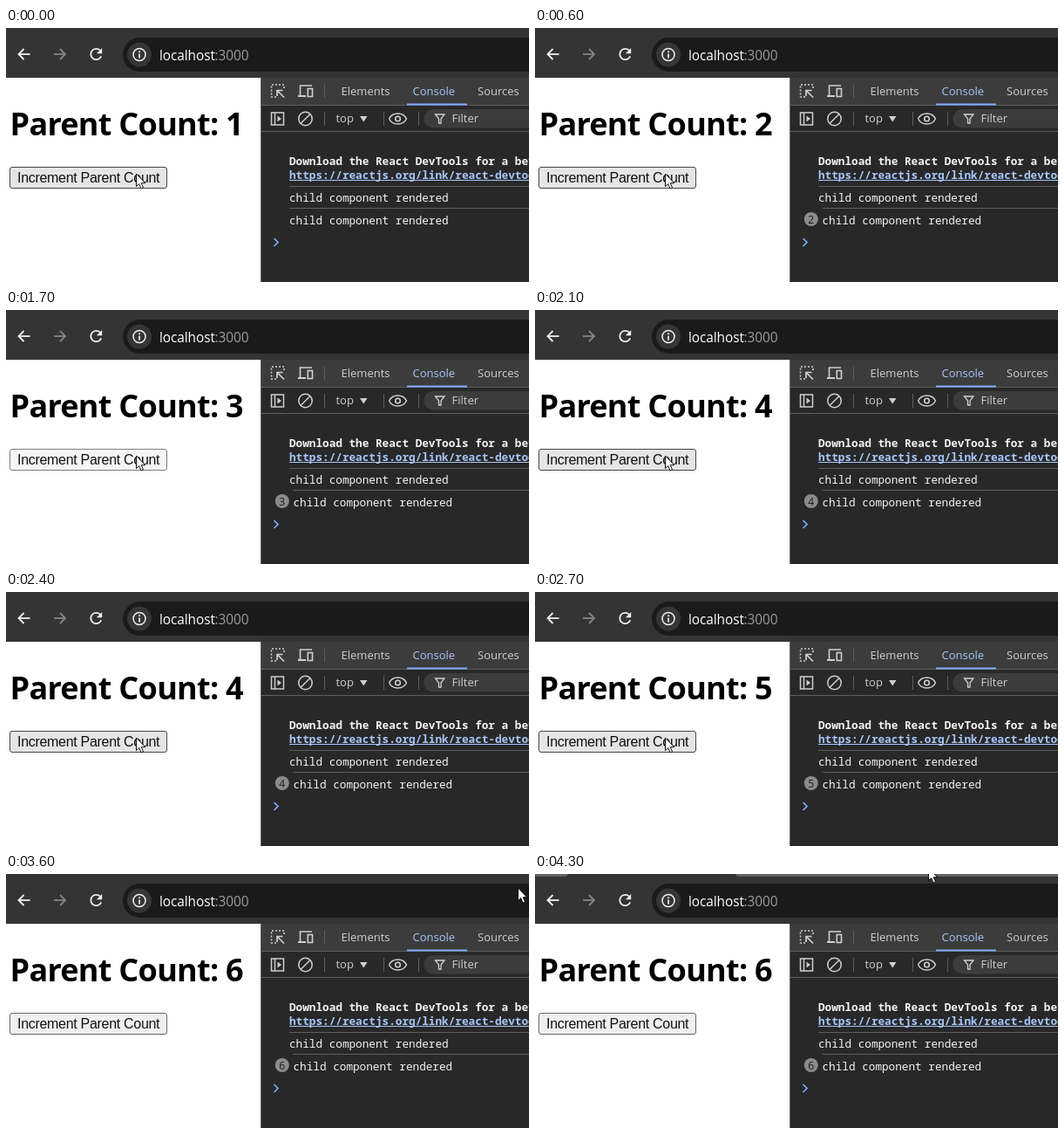
These frames come from a looping animation (600x291 px, 4400 ms). An HTML page with a canvas:

```html
<!DOCTYPE html>
<html lang="en">
<head>
<meta charset="utf-8">
<title>Parent Count</title>
<style>
  html, body { margin: 0; width: 100%; height: 100%; overflow: hidden; background: #fff; }
  canvas { display: block; width: 600px; height: 291px; }
</style>
</head>
<body>
<canvas id="stage"></canvas>
<script>
const W = 600, H = 291, LOOP = 4400, STEP = 100;
const UI = '"Open Sans", "Noto Sans", sans-serif';
const MONO = '"Noto Sans Mono", "DejaVu Sans Mono", monospace';
const ARIAL = '"Liberation Sans", Arial, sans-serif';
const BAR = '#3c3c3c', CONSOLE = '#282828', RULE = '#5e5e5e';
const ICON = '#cfcfcf', BLUE = '#7cacf8', PALE = '#a8c7fa';

const canvas = document.getElementById('stage');
const ctx = canvas.getContext('2d');
const dpr = window.devicePixelRatio || 1;
canvas.width = W * dpr;
canvas.height = H * dpr;

// Each release of the button adds one; it is held down just before.
const CLICKS = [400, 1100, 1800, 2600, 3200];
const HOLD = 100;
const POINTER = [[0, 149, 167], [3300, 149, 167], [3600, 587, 16], [3800, 570, 8], [4200, 451, -7]];

function rect(x, y, w, h, color) {
  ctx.fillStyle = color;
  ctx.fillRect(x, y, w, h);
}

function pill(x, y, w, h, r, fill, stroke) {
  ctx.beginPath();
  ctx.roundRect(x, y, w, h, r);
  ctx.fillStyle = fill;
  ctx.fill();
  if (stroke) { ctx.strokeStyle = stroke; ctx.lineWidth = 1; ctx.stroke(); }
}

function disc(x, y, r, color) {
  ctx.beginPath();
  ctx.arc(x, y, r, 0, 7);
  ctx.fillStyle = color;
  ctx.fill();
}

function ring(x, y, r, color, width) {
  ctx.beginPath();
  ctx.arc(x, y, r, 0, 7);
  ctx.strokeStyle = color;
  ctx.lineWidth = width;
  ctx.stroke();
}

function line(points, color, width = 1.5) {
  ctx.beginPath();
  points.forEach(([x, y]) => ctx.lineTo(x, y));
  ctx.strokeStyle = color;
  ctx.lineWidth = width;
  ctx.stroke();
}

function poly(points, color) {
  ctx.beginPath();
  points.forEach(([x, y]) => ctx.lineTo(x, y));
  ctx.closePath();
  ctx.fillStyle = color;
  ctx.fill();
}

function text(str, x, y, font, color, spacing = 0) {
  ctx.font = font;
  ctx.letterSpacing = spacing + 'px';
  ctx.fillStyle = color;
  ctx.fillText(str, x, y);
}

function arrow(x, y, dir, color) {
  const tip = x + 6.5 * dir;
  line([[x - 6.5 * dir, y], [tip, y]], color, 1.8);
  line([[tip - 6 * dir, y - 6], [tip, y], [tip - 6 * dir, y + 6]], color, 1.8);
}

function drawBrowserBar(tabsShown) {
  rect(0, 0, W, 57, '#343435');
  if (tabsShown) {
    pill(-6, -6, 44, 9, 4, '#626264');
    pill(230, -6, 380, 9, 4, '#626264');
  }
  arrow(21, 30, -1, '#f0f0f0');
  arrow(61.5, 30, 1, '#858585');

  ctx.beginPath();
  ctx.arc(103.5, 30, 6.2, 0.4, 5.5);
  ctx.strokeStyle = '#f0f0f0';
  ctx.lineWidth = 1.8;
  ctx.stroke();
  poly([[110.2, 23], [110.2, 29.3], [103.9, 29.3]], '#f0f0f0');

  pill(134, 11, 520, 39, 19.5, '#1a1a1a');
  disc(153, 30.5, 14, '#363637');
  ring(153, 30.5, 7, '#f0f0f0', 1.5);
  rect(152.2, 29.5, 1.7, 5, '#f0f0f0');
  rect(152.2, 26.3, 1.7, 1.8, '#f0f0f0');
  text('localhost', 176, 36.5, `15.4px ${UI}`, '#fff', -0.08);
  text(':3000', 239.5, 36.5, `15.4px ${UI}`, '#9b9b9b', -0.08);
}

function drawPage(count, hover, pressed) {
  rect(0, 57, 292, H - 57, '#fff');
  text(`Parent Count: ${count}`, 4.5, 122.5, `bold 36px ${UI}`, '#000', -0.72);
  const fill = pressed ? '#f5f5f5' : hover ? '#e5e5e5' : '#efefef';
  const edge = pressed ? '#7d7d7d' : hover ? '#454545' : '#666';
  pill(4.5, 159.5, 180, 24, 2.5, fill, edge);
  text('Increment Parent Count', 13, 177, `16px ${ARIAL}`, '#111', -0.3);
}

function drawTabs() {
  rect(292, 57, W - 292, 31, BAR);
  rect(292, 88, W - 292, 1, RULE);

  // element picker
  ctx.setLineDash([2, 2]);
  line([[310, 79], [304.5, 79], [304.5, 65], [319, 65], [319, 70]], ICON);
  ctx.setLineDash([]);
  line([[311, 78], [311, 71.5], [317.5, 71.5]], ICON, 1.7);
  line([[311, 71.5], [319, 79.5]], ICON, 1.7);

  // device toolbar
  line([[351, 66], [337.5, 66], [337.5, 77]], ICON, 1.6);
  line([[335, 78], [344, 78]], ICON, 2);
  ctx.lineWidth = 1.6;
  ctx.strokeRect(346.3, 69.5, 5.2, 9);

  rect(365, 65, 1, 15, RULE);
  const font = `13px ${UI}`;
  text('Elements', 384.5, 77, font, ICON);
  text('Console', 466.5, 77, font, PALE);
  text('Sources', 541, 77, font, ICON);
  rect(460, 86.5, 69, 2, BLUE);
}

function drawConsoleBar() {
  rect(292, 89, W - 292, 29, CONSOLE);
  rect(292, 118, W - 292, 1, RULE);

  ctx.strokeStyle = ICON;
  ctx.lineWidth = 1.5;
  ctx.strokeRect(304.5, 97, 14, 14);
  line([[308.5, 97], [308.5, 111]], ICON);
  poly([[311.5, 100.5], [316, 104], [311.5, 107.5]], ICON);

  ring(343.5, 104, 7.7, ICON, 1.5);
  line([[338.2, 109.3], [348.8, 98.7]], ICON);

  for (const x of [365, 433, 473]) rect(x, 96, 1, 16, RULE);
  const font = `13px ${UI}`;
  text('top', 378.5, 108, font, ICON);
  poly([[406, 101], [414.5, 101], [410.2, 107.5]], ICON);

  ctx.beginPath();
  ctx.moveTo(439.5, 104);
  ctx.bezierCurveTo(443.5, 96, 455.5, 96, 459.5, 104);
  ctx.bezierCurveTo(455.5, 112, 443.5, 112, 439.5, 104);
  ctx.strokeStyle = ICON;
  ctx.lineWidth = 1.5;
  ctx.stroke();
  ring(449.5, 104, 2.8, ICON, 1.6);

  pill(479.5, 93, 160, 21.5, 10.7, BAR);
  line([[496.5, 109], [496.5, 104], [492.5, 99], [503, 99], [499, 104], [499, 109], [496, 109]], ICON, 1.3);
  text('Filter', 511.5, 108, font, ICON);
}

function drawConsole(count) {
  rect(292, 119, W - 292, H - 119, CONSOLE);
  const font = `12.7px ${MONO}`, color = '#f4f4f4';
  text('Download the React DevTools for a better', 325, 157, `bold ${font}`, color);
  text('https://reactjs.org/link/react-devtools', 325, 173, `bold ${font}`, PALE);
  rect(325, 174, W - 325, 1, PALE);
  rect(325, 181, W - 325, 1, RULE);
  text('child component rendered', 325, 199, font, color);

  const x = count > 1 ? 329.5 : 325;
  rect(x, 206, W - x, 1, RULE);
  text('child component rendered', x, 225, font, color);
  if (count > 1) {
    disc(316.8, 219, 8, '#8b8b8b');
    ctx.textAlign = 'center';
    text(count, 316.8, 223.5, `12px ${UI}`, '#1c1c1c');
    ctx.textAlign = 'left';
  }
  line([[307.5, 241], [312, 245.5], [307.5, 250]], BLUE, 1.7);
}

function drawPointer([x, y]) {
  ctx.save();
  ctx.translate(x, y);
  ctx.beginPath();
  [[0.5, 0], [0.5, 14.6], [3.7, 11.6], [6, 17], [8.5, 15.9], [6.2, 10.7], [10.8, 10.7]]
    .forEach(([px, py]) => ctx.lineTo(px, py));
  ctx.closePath();
  ctx.fillStyle = '#fff';
  ctx.fill();
  ctx.strokeStyle = '#111';
  ctx.lineWidth = 1;
  ctx.stroke();
  ctx.restore();
}

function pointerAt(t) {
  const next = POINTER.findIndex(p => p[0] > t);
  if (next < 0) return POINTER[POINTER.length - 1].slice(1);
  const [t0, x0, y0] = POINTER[next - 1], [t1, x1, y1] = POINTER[next];
  const u = (t - t0) / (t1 - t0), k = u * u * (3 - 2 * u);
  return [x0 + (x1 - x0) * k, y0 + (y1 - y0) * k];
}

function draw(t) {
  const count = 1 + CLICKS.filter(c => t >= c).length;
  const pressed = CLICKS.some(c => t >= c - HOLD && t < c);
  const pointer = pointerAt(t);
  const hover = pointer[0] < 185 && pointer[1] > 160;
  ctx.setTransform(dpr, 0, 0, dpr, 0, 0);
  drawBrowserBar(t >= 4300);
  drawPage(count, hover, pressed);
  drawTabs();
  drawConsoleBar();
  drawConsole(count);
  rect(292, 57, 1, H - 57, RULE);
  drawPointer(pointer);
}

const start = performance.now();
function tick() {
  const t = (performance.now() - start) % LOOP;
  draw(Math.floor(t / STEP) * STEP);
  requestAnimationFrame(tick);
}
tick();
</script>
</body>
</html>
```
